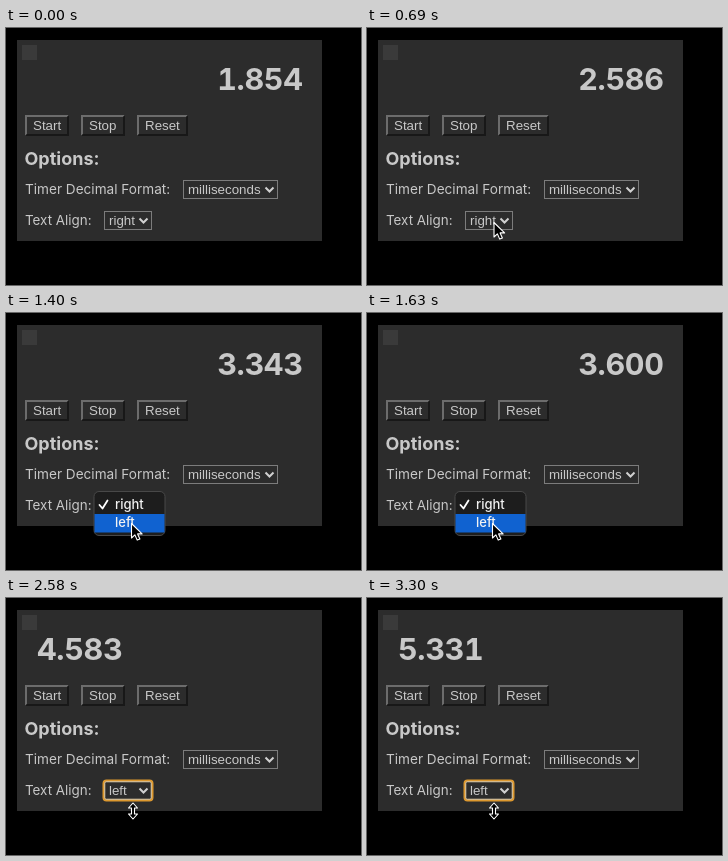
These frames come from a looping animation (355x257 px, 3380 ms). An HTML page:

```html
<!DOCTYPE html>
<html lang="en">
<head>
<meta charset="utf-8">
<title>Timer</title>
<style>
  html, body { margin: 0; width: 100%; height: 100%; overflow: hidden; background: #000; }
  svg { display: block; width: 355px; height: 257px; }
  text { fill: #c8c8c8; font: 13.6px Inter, sans-serif; white-space: pre; }
  #time { font-size: 30.5px; font-weight: 700; font-variant-numeric: tabular-nums; letter-spacing: -.35px; }
  .head { font-size: 18px; font-weight: 700; }
  .ctl { font: 13.333px "Liberation Sans", Arial, sans-serif; }
  .item { font-size: 13px; font-weight: 500; fill: #f2f2f2; }
  .box { fill: #2c2c2c; stroke: #7c7c7c; }
  .chev { fill: none; stroke: #d0d0d0; stroke-width: 2; }
</style>
</head>
<body>
<svg viewBox="0 0 355 257">
  <rect x="11" y="12" width="305" height="201" fill="#2c2c2c"/>
  <rect x="16" y="17" width="15" height="15" fill="#3a3a3a"/>
  <text id="time" y="61.5"></text>
  <g id="buttons"></g>
  <text class="head" x="18.5" y="137">Options:</text>
  <text x="19" y="166">Timer Decimal Format:</text>
  <rect class="box" x="177.5" y="152.5" width="94" height="18"/>
  <text class="ctl" x="182" y="166">milliseconds</text>
  <path class="chev" d="M259.5 159.5l4 4 4-4"/>
  <text x="19" y="197" style="font-size:13.4px">Text Align:</text>
  <rect class="box" x="98.5" y="183.5" width="47" height="18"/>
  <g id="ring" fill="none">
    <rect x="97.5" y="182.5" width="49" height="20" rx="3" stroke="#dc982f" stroke-width="2"/>
    <rect x="98.8" y="183.8" width="46.4" height="17.4" rx="1.5" stroke="#f0dfbd" stroke-width=".8"/>
  </g>
  <text class="ctl" id="align" x="103" y="197"></text>
  <path class="chev" d="M133.5 190.5l4 4 4-4"/>
  <g id="menu">
    <rect x="88" y="178.5" width="71" height="44" rx="5" fill="#1d1d1d" stroke="#484848"/>
    <rect id="pick" x="88.5" width="70" height="18.5" fill="#1062d0"/>
    <path d="M93.5 192l3 3.5 5-8" fill="none" stroke="#fff" stroke-width="1.8" stroke-linecap="round" stroke-linejoin="round"/>
    <text class="item" x="109" y="196">right</text>
    <text class="item" x="109" y="214">left</text>
  </g>
  <path id="arrow" d="M0 0V14.5L3.4 11.4 5.7 16.6 8.4 15.4 6.1 10.4H10.6Z" fill="#000" stroke="#fff" stroke-width="1.1" stroke-linejoin="round"/>
  <path id="resize" d="M127 205l4.5 5h-3v6h3l-4.5 5-4.5-5h3v-6h-3Z" fill="#000" stroke="#fff" stroke-width="1.1" stroke-linejoin="round"/>
</svg>
<script>
const LOOP = 3380, OPEN = 850, HOVER = 1320, CHOOSE = 1790;
const $ = id => document.getElementById(id);
const show = (id, on) => $(id).setAttribute("visibility", on ? "visible" : "hidden");

// Screen refreshes: runs of seven, about 80 ms apart
const runs = [[80, 530], [610, 1080], [1160, 1630], [1710, 2180], [2260, 2740], [2820, 3300]];
const ticks = [0];
for (const [a, b] of runs)
  for (let k = 0; k < 7; k++) ticks.push(Math.round((a + (b - a) * k / 6) / 10) * 10);

// [refresh, seconds]
const clock = [[0, 1.854], [9, 2.586], [14, 3.001], [21, 3.6], [27, 4.083], [33, 4.583], [42, 5.331]];
// [ms, value]
const pathX = [[150, 138], [530, 127], [1080, 127], [1400, 125.5]];
const pathY = [[150, 250], [360, 214], [530, 194.5], [690, 194.5], [1000, 199], [1160, 199], [1400, 210.5]];

function lerp(keys, t) {
  if (t <= keys[0][0]) return keys[0][1];
  for (let i = 1; i < keys.length; i++) {
    const [a, u] = keys[i - 1], [b, v] = keys[i];
    if (t <= b) return u + (v - u) * (t - a) / (b - a);
  }
  return keys[keys.length - 1][1];
}

function button(x, w, label) {
  const r = x + w;
  return `<path d="M${x} 108V87H${r}l-2 2H${x + 2}V106Z" fill="#6c6c6c"/>
    <path d="M${r} 87V108H${x}l2-2H${r - 2}V89Z" fill="#181818"/>
    <text class="ctl" x="${x + 8}" y="102">${label}</text>`;
}
$("buttons").innerHTML = button(19, 44, "Start") + button(75, 44, "Stop") + button(131, 51, "Reset");

function draw(now) {
  const ms = now % LOOP;
  let n = ticks.length - 1;
  while (ticks[n] > ms) n--;
  const t = ticks[n], left = t >= CHOOSE;

  const time = $("time");
  time.textContent = lerp(clock, n).toFixed(3);
  time.setAttribute("x", left ? 31 : 296.5);
  time.setAttribute("text-anchor", left ? "start" : "end");

  $("align").textContent = left ? "left" : "right";
  show("ring", left);
  show("menu", t >= OPEN && !left);
  $("pick").setAttribute("y", t < HOVER ? 182 : 201);
  show("arrow", t >= 150 && !left);
  show("resize", left);
  $("arrow").setAttribute("transform", `translate(${lerp(pathX, t)} ${lerp(pathY, t)})`);
}

const start = performance.now();
function loop() {
  draw(performance.now() - start);
  requestAnimationFrame(loop);
}
draw(0);
requestAnimationFrame(loop);
</script>
</body>
</html>
```
